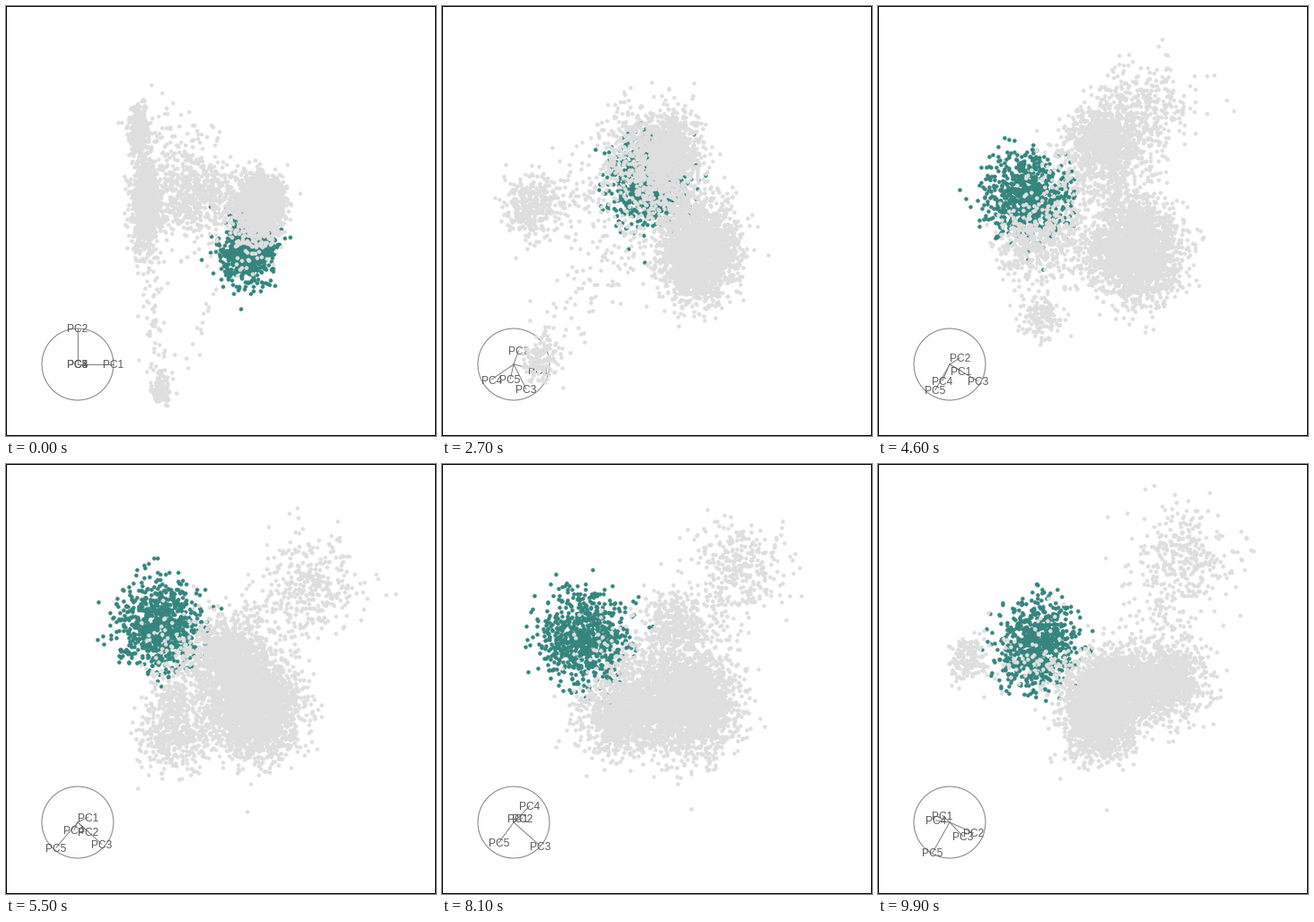
These frames come from a looping animation (480x480 px, 10000 ms). A matplotlib script:

```python
import numpy as np
import matplotlib.pyplot as plt
from matplotlib.animation import FuncAnimation
from matplotlib.patches import Circle, Rectangle

SIZE, DPI = 480, 100
PX = 72 / DPI  # one pixel in points
FRAMES, INTERVAL = 100, 100
TEAL, GREY, LINE, TEXT = "#35857e", "#dedede", "#808080", "#5a5a5a"
CENTER = np.array([SIZE / 2, SIZE / 2])
HUB, RADIUS = np.array([80, 400]), 40
FLIP = np.array([1, -1])
PAUSES = np.array([15, 31, 43, 57, 74, 92])  # the tour rests on each new basis

rng = np.random.default_rng(7)


def cloud(count, start, end=None, spread=(12, 17, 20)):
    """Gaussian points around start, or along the line from start to end.

    spread holds the deviation in PC1, in PC2 and in each of the other three.
    """
    u = rng.random((count, 1))
    line = np.array(start) + u * np.subtract(start if end is None else end, start)
    sd = np.repeat(spread, (1, 1, 3))
    return line + rng.normal(0, sd, (count, 5))


# Cluster centres in the five components, in pixels
MAIN = (45, 18, 42, 0, 14)
COLUMN = (-85, 15, 0, -105, -30)
TOP = (-93, 105, -44, 122, 36)
TAIL = (-68, -188, 56, 125, 5)
FAR = (-32, 38, -8, 38, -182)
MARKED = (30, -32, -90, -11, 14)

marked = cloud(780, MARKED, spread=(15, 18, 25))
others = np.vstack([
    cloud(2150, MAIN, spread=(11, 15, 27)),
    cloud(850, COLUMN, spread=(7, 25, 23)),
    cloud(260, TOP, spread=(5, 13, 18)),
    cloud(120, TAIL, spread=(5, 8, 13)),
    cloud(260, FAR, spread=(17, 32, 28)),
    cloud(80, FAR, COLUMN),
    cloud(90, FAR, MAIN),
    cloud(330, COLUMN, MAIN),
    cloud(150, COLUMN, TOP, (7, 17, 20)),
    cloud(130, TOP, MAIN),
    cloud(80, TAIL, COLUMN, (7, 17, 20)),
    cloud(25, TAIL, MARKED),
    cloud(110, MAIN, MARKED),
])


def basis(x, y):
    """Nearest orthonormal pair to two rough axis rows."""
    u, _, vt = np.linalg.svd(np.array([x, y], float), full_matrices=False)
    return u @ vt


def travel(a, b, t):
    """Geodesic from basis a to basis b; t beyond 1 carries on."""
    u, s, vt = np.linalg.svd(a @ b.T)
    s = np.clip(s, -1, 1)[:, None]
    angle = np.arccos(s) * t
    start = u.T @ a
    side = vt @ b - s * start
    side /= np.maximum(np.linalg.norm(side, axis=1, keepdims=True), 1e-9)
    spin = u @ vt
    phi = -t * np.arctan2(spin[1, 0], spin[0, 0])
    c, d = np.cos(phi), np.sin(phi)
    return np.array([[c, -d], [d, c]]) @ u @ (np.cos(angle) * start + np.sin(angle) * side)


# Key bases by tour step, then two turning points just past known ones
keys = {
    0: np.eye(5)[:2],
    16: basis((.87, .11, .14, -.30, .33), (.05, .40, -.88, -.25, -.15)),
    29: basis((.54, .14, .38, -.68, -.25), (-.20, .36, -.60, -.48, -.48)),
    35: basis((.46, .19, .67, -.44, -.31), (-.25, .33, -.52, -.52, -.57)),
    52: basis((.29, .30, .67, -.10, -.60), (.15, -.27, -.62, -.22, -.72)),
    65: basis((.25, .03, .71, .48, -.43), (-.05, .13, -.67, .53, -.52)),
    76: basis((.12, .24, .75, .44, -.41), (.12, .12, -.67, .45, -.57)),
    93: basis((-.20, .66, .37, -.38, -.48), (.20, -.30, -.40, .05, -.87)),
}
for s0, s1, turn in ((29, 35, 40), (52, 65, 69)):
    keys[turn] = travel(keys[s0], keys[s1], (turn - s0) / (s1 - s0))
steps = sorted(keys)


def basis_at(frame):
    step = frame - np.sum(PAUSES <= frame)
    i = np.clip(np.searchsorted(steps, step), 1, len(steps) - 1)
    s0, s1 = steps[i - 1], steps[i]
    return travel(keys[s0], keys[s1], (step - s0) / (s1 - s0))


fig = plt.figure(figsize=(SIZE / DPI, SIZE / DPI), dpi=DPI, facecolor="white")
ax = fig.add_axes([0, 0, 1, 1])
ax.set(xlim=(0, SIZE), ylim=(SIZE, 0))
ax.axis("off")

ax.add_patch(Rectangle((.5, .5), SIZE - 1, SIZE - 1, fill=False, ec="black", lw=PX,
                       snap=False, zorder=9))
ax.add_patch(Circle(HUB, RADIUS, fill=False, ec=LINE, lw=PX, zorder=1))
spokes = [ax.plot([], [], color=LINE, lw=PX, zorder=1)[0] for _ in range(5)]
labels = [ax.text(*HUB, f"PC{i + 1}", family="Liberation Sans", fontsize=12 * PX,
                  color=TEXT, ha="center", va="center_baseline", zorder=2) for i in range(5)]


def dots(color, order):
    return ax.scatter([], [], s=(4.5 * PX) ** 2, c=color, linewidths=0, zorder=order)


layers = [(dots(TEAL, 3), marked), (dots(GREY, 4), others)]


def update(frame):
    view = basis_at(frame)
    for layer, points in layers:
        layer.set_offsets(CENTER + points @ view.T * FLIP)
    for spoke, label, tip in zip(spokes, labels, HUB + RADIUS * view.T * FLIP):
        spoke.set_data([HUB[0], tip[0]], [HUB[1], tip[1]])
        label.set_position(tip)
    return [*spokes, *labels, *(layer for layer, _ in layers)]


anim = FuncAnimation(fig, update, frames=FRAMES, interval=INTERVAL, repeat=True, repeat_delay=0)
plt.show()
```
